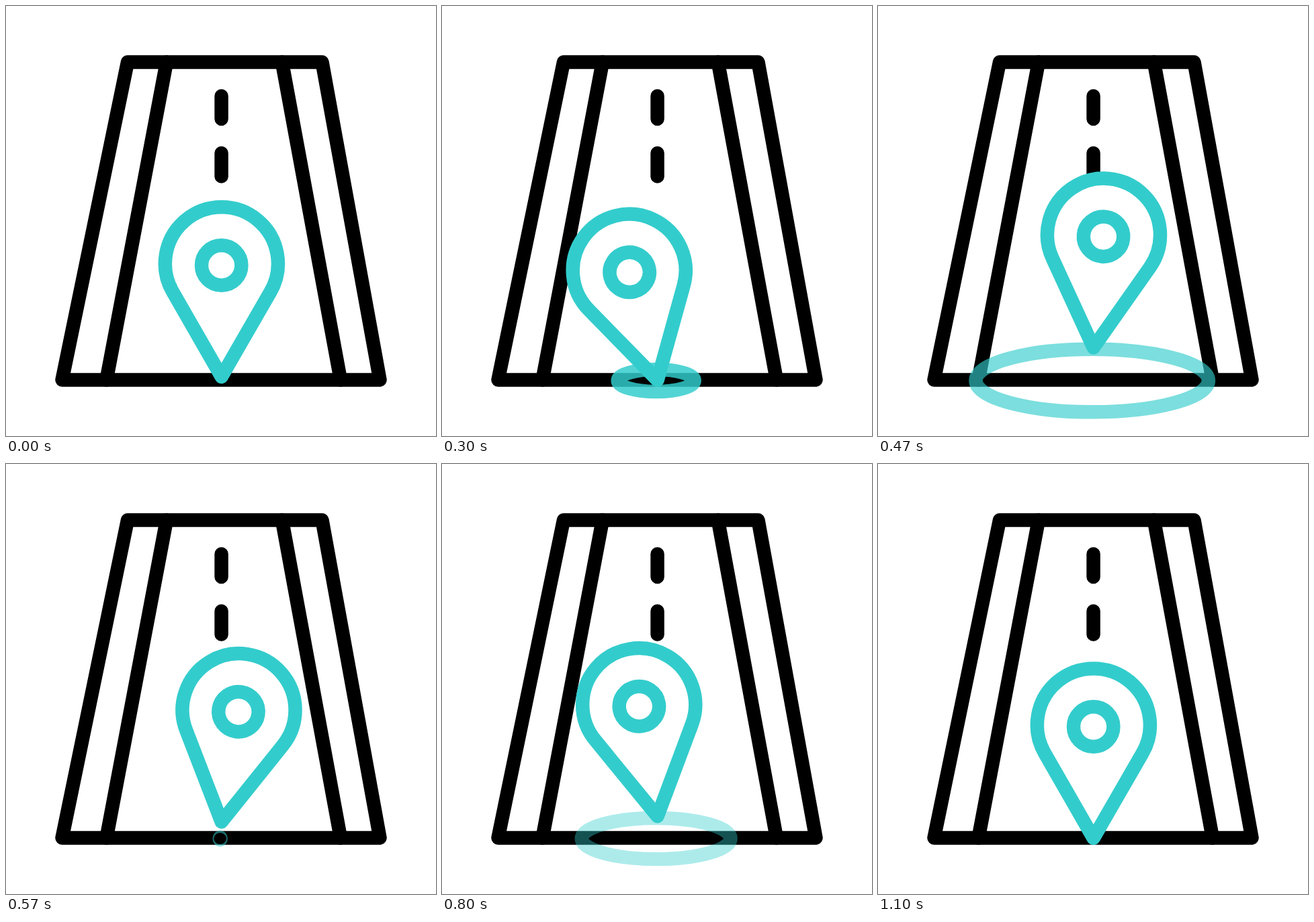
These frames come from a looping animation (640 px wide and 640 px high, 1.67 s). An HTML page:

```html
<!DOCTYPE html>
<html lang="en">
<head>
<meta charset="utf-8">
<title>Road pin</title>
<style>
  html, body { margin: 0; width: 100%; height: 100%; overflow: hidden; background: #fff; }
  svg { display: block; width: 100vw; height: 100vh; }
  g, ellipse { fill: none; stroke-width: 20.5; stroke-linecap: round; stroke-linejoin: round; }
  .road { stroke: #000; }
  .teal { stroke: #3cc; }
</style>
</head>
<body>
<svg viewBox="0 0 640 640">
  <g class="road">
    <path d="M181 83.5H470.5L556.5 556.5H83.5Z"/>
    <path d="M239 83.5L149.5 556.5M410.8 83.5L498 556.5"/>
    <path d="M320.6 134V168M320.6 219V253.5"/>
  </g>
  <ellipse id="ripple" class="teal" cx="318.7" cy="557.5"/>
  <g id="pin" class="teal">
    <path d="M320.7 556.8L248.4 430.8A84 84 0 1 1 393.4 430.8Z"/>
    <circle cx="320.7" cy="391" r="29.7"/>
  </g>
</svg>
<script>
  const LOOP = 1670;
  const TIP = '320.6 556.8';
  const pin = document.getElementById('pin');
  const ripple = document.getElementById('ripple');

  // Tracks of [step, value], 30 steps per second
  const lift = [[0, 0], [5, 48.5], [10, 0], [15, 48.5], [21, 0], [26, 36.3], [33, 0]];
  const tilt = [[5, 0], [10, -14.5], [17, 10], [23.6, -10], [33.6, 0]];
  const fade = [[6, 1], [21, 0.4]];
  const waves = [
    { from: 6, to: 18, size: [[5.9, 1], [17.5, 196.5]] },
    { from: 18, to: 32, size: [[18, 1], [31, 198.2]] }
  ];

  const smooth = u => u * u * (3 - 2 * u);
  const linear = u => u;

  function valueAt(track, s, ease = smooth) {
    if (s <= track[0][0]) return track[0][1];
    for (let i = 1; i < track.length; i++) {
      const [s0, v0] = track[i - 1], [s1, v1] = track[i];
      if (s < s1) return v0 + (v1 - v0) * ease((s - s0) / (s1 - s0));
    }
    return track[track.length - 1][1];
  }

  function draw(ms) {
    const cs = Math.floor((ms % LOOP) / 10);
    const step = Math.floor((cs * 3 + 1) / 10) + 1;

    pin.setAttribute('transform',
      `translate(0 ${-valueAt(lift, step)}) rotate(${valueAt(tilt, step)} ${TIP})`);

    const wave = waves.find(w => step >= w.from && step < w.to);
    ripple.style.display = wave ? '' : 'none';
    if (wave) {
      const rx = valueAt(wave.size, step);
      ripple.setAttribute('rx', rx);
      ripple.setAttribute('ry', 1.5 + rx * 0.262);
      ripple.setAttribute('opacity', valueAt(fade, step, linear));
    }
  }

  const start = performance.now();
  function tick() {
    draw(performance.now() - start);
    requestAnimationFrame(tick);
  }
  tick();
</script>
</body>
</html>
```
